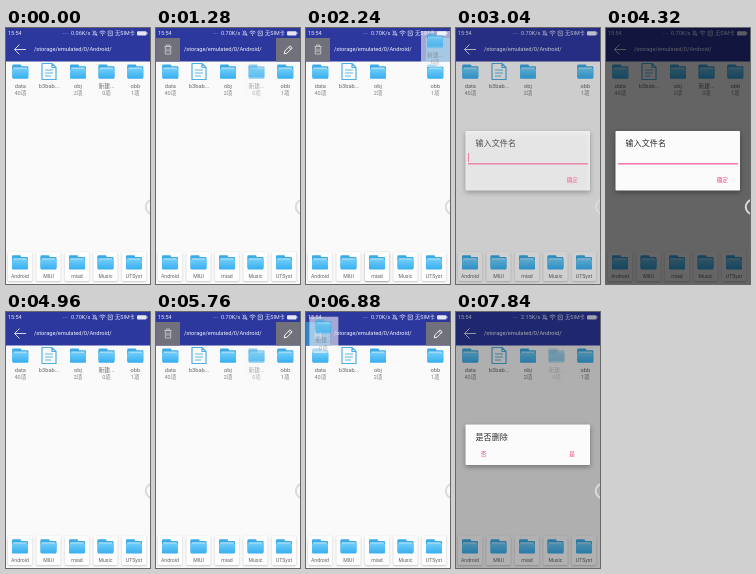
Write an HTML page with a canvas that moves like this. It is 144 px wide and 256 px high and loops after 8 s.

```html
<!DOCTYPE html>
<html lang="zh">
<head>
<meta charset="utf-8">
<style>
html, body { margin: 0; width: 100%; height: 100%; overflow: hidden; background: #fafafa; }
canvas { display: block; width: 100vw; height: 100vh; }
</style>
</head>
<body>
<canvas id="stage"></canvas>
<script>
const W = 144, H = 256, LOOP = 8000, STEP = 160;
const BLUE = '#2d389f', PINK = '#f0478a', GRAY = '#70717a', HOVER = '#3083ca';
const FONT = 'Roboto, "Noto Sans CJK SC", "Noto Sans CJK", sans-serif';
const canvas = document.getElementById('stage');
const ctx = canvas.getContext('2d');

const clamp = v => Math.max(0, Math.min(1, v));
const ramp = (t, a, b) => clamp((t - a) / (b - a));
const ease = v => v * v * (3 - 2 * v);
const within = (t, a, b) => t >= a && t < b;

function resize() {
  const dpr = window.devicePixelRatio || 1;
  canvas.width = Math.round(innerWidth * dpr);
  canvas.height = Math.round(innerHeight * dpr);
}

function rect(x, y, w, h, color) {
  ctx.fillStyle = color;
  ctx.fillRect(x, y, w, h);
}

function rounded(x, y, w, h, r, color) {
  ctx.fillStyle = color;
  ctx.beginPath();
  ctx.roundRect(x, y, w, h, r);
  ctx.fill();
}

function text(s, x, y, size, color, align = 'left') {
  ctx.font = `${size}px ${FONT}`;
  ctx.textAlign = align;
  ctx.textBaseline = 'middle';
  ctx.fillStyle = color;
  ctx.fillText(s, x, y);
}

function line(d, color, width = 1) {
  ctx.strokeStyle = color;
  ctx.lineWidth = width;
  ctx.stroke(new Path2D(d));
}

function at(x, y, alpha, draw) {
  ctx.save();
  ctx.translate(x, y);
  ctx.globalAlpha *= alpha;
  draw();
  ctx.restore();
}

function shadowed(blur, dy, alpha, draw) {
  const k = canvas.width / W;
  ctx.save();
  ctx.shadowColor = `rgba(0,0,0,${alpha})`;
  ctx.shadowBlur = blur * k;
  ctx.shadowOffsetY = dy * k;
  draw();
  ctx.restore();
}

function folder(x, y) {
  at(x, y, 1, () => {
    rounded(-8, -7, 9, 5, 1, '#3aabe6');
    rounded(-8, -5.3, 16, 11, 1, '#3aabe6');
    rect(-6.8, -4, 13.6, 2, '#b5e0f7');
    const g = ctx.createLinearGradient(0, -3, 0, 7);
    g.addColorStop(0, '#70cdf9');
    g.addColorStop(1, '#38aff0');
    rounded(-8, -2.8, 16, 10, 1, g);
  });
}

function documentIcon(x, y) {
  at(x, y, 1, () => {
    ctx.lineJoin = 'round';
    line('M-7 -8H3L7 -4V8H-7ZM3 -8V-4H7', '#4fb0e3', 1.2);
    line('M-4 -1.5H4M-4 1.5H4M-4 4.5H2', '#62b8e5', 1);
  });
}

function item(x, name, count) {
  if (count) folder(x, 43.5);
  else documentIcon(x, 43.5);
  text(name, x, 58, 5.7, '#666', 'center');
  if (count) text(count, x, 65.4, 5.5, '#808080', 'center');
}

const newFolder = () => item(100.5, '新建...', '0项');

function statusBar(t) {
  const speed = t < 1280 ? '0.06' : t < 7040 ? '0.70' : '2.15';
  const ink = '#e4e6f5';
  text('15:54', 2, 5.3, 5.5, ink);
  text('...', 57, 4.6, 6, ink);
  text(speed + 'K/s', 65, 5.3, 5.5, ink);
  line('M86.6 6.8H91L90 5.5V4Q88.8 1.5 87.6 4V5.5ZM86.5 2.5L91.2 8', ink, .6);
  line('M93.5 4.2Q96.5 1.6 99.5 4.2M94.7 5.6Q96.5 4 98.3 5.6', ink, .8);
  rect(96, 6.5, 1, 1.2, ink);
  line('M102.2 3H106.4V7.7H102.2ZM103.3 4.3L105.3 6.4M105.3 4.3L103.3 6.4', ink, .6);
  text('无SIM卡', 109, 5.3, 5.3, ink);
  rounded(131, 3.2, 9.5, 4.2, 1, ink);
  rect(140.6, 4.3, .8, 2, ink);
}

function header(dragging, t) {
  rect(0, 0, W, 33.5, BLUE);
  statusBar(t);
  text('/storage/emulated/0/Android/', 28, 21.7, 5.7, '#f0f1fa');
  if (!dragging) {
    line('M20 21.5H8.5M13.5 16.5L8.5 21.5L13.5 26.5', '#e8eaf6', .9);
    return;
  }
  const overTrash = t >= 6880, overPencil = within(t, 1920, 2720);
  rect(0, 10, 24, 23.5, overTrash ? HOVER : GRAY);
  rect(120, 10, 24, 23.5, overPencil ? HOVER : GRAY);
  line('M8.5 18.5H15.5M10.5 18.5V17H13.5V18.5M9.3 18.5V26H14.7V18.5M11 20.5V24M13 20.5V24', '#d2d2d6', .8);
  if (!overPencil) {
    line('M128.2 25.8L128.8 23L134 17.8L136.2 20L131 25.2ZM132.7 19.2L134.8 21.3', '#fff', .9);
  }
}

function shelf(pressed) {
  ['Android', 'MIUI', 'miad', 'Music', 'UTSyst'].forEach((name, i) => {
    const x = 14 + i * 28.5;
    shadowed(2, .8, pressed && i === 2 ? .45 : .24, () =>
      rounded(x - 12.2, 224, 24.4, 29, 1.2, '#fdfdfd'));
    folder(x, 234.3);
    text(name, x, 248, 5.2, '#666', 'center');
  });
}

function dialog(y, h, alpha, title, content) {
  if (!alpha) return;
  ctx.save();
  ctx.globalAlpha = alpha;
  shadowed(5, 2, .35, () => rounded(9.5, y, 124.5, h, 1, '#fbfbfb'));
  text(title, 19.5, y + 13, 8.1, '#2c2c2c');
  content();
  ctx.restore();
}

function renameDialog(t) {
  const alpha = ramp(t, 2860, 3085) * (1 - ramp(t, 4440, 4600));
  dialog(103, 59.5, alpha, '输入文件名', () => {
    rect(12, 135.3, 120, 1.1, PINK);
    if ((t - 2600) % 1000 < 500) rect(12, 125, .8, 9, PINK);
    text('确定', 116.3, 152, 5.6, PINK, 'center');
  });
}

function deleteDialog(t) {
  dialog(112.5, 40.5, ramp(t, 7600, 7840), '是否删除', () => {
    text('否', 27.5, 142.3, 5.7, PINK, 'center');
    text('是', 116, 142.3, 5.7, PINK, 'center');
  });
}

function dragGhost(t) {
  const first = t < 4000;
  const p = ease(first ? ramp(t, 1360, 2120) : ramp(t, 5920, 7040));
  const [dx, dy] = first ? [28.5, -31] : [-88, -31];
  at(dx * p, dy * p, .58, () => {
    rect(86.5, 34, 29, 36, '#fafafa');
    newFolder();
  });
}

function draw(t) {
  ctx.setTransform(canvas.width / W, 0, 0, canvas.height / H, 0, 0);
  ctx.globalAlpha = 1;
  rect(0, 0, W, H, '#fafafa');
  const dragging = within(t, 960, 2720) || within(t, 5200, 7520);

  header(dragging, t);
  item(14.3, 'data', '40项');
  item(43, 'b3bab...');
  item(72, 'obj', '2项');
  item(129.3, 'obb', '1项');
  shelf(within(t, 1760, 2720));

  if (dragging) {
    dragGhost(t);
  } else {
    const back = within(t, 2720, 4000) ? ramp(t, 3040, 3400)
      : t >= 7520 ? ramp(t, 7680, 8200) : 1;
    at(0, 0, back, newFolder);
  }

  const dim = .6 * (ramp(t, 2920, 3320) * (1 - ramp(t, 4450, 4850)) + ramp(t, 7640, 8040));
  rect(0, 0, W, H, `rgba(0,0,0,${dim})`);
  renameDialog(t);
  deleteDialog(t);

  ctx.beginPath();
  ctx.arc(147, 179, 7.2, 0, Math.PI * 2);
  ctx.strokeStyle = '#dadada';
  ctx.lineWidth = 2;
  ctx.stroke();
}

const start = performance.now();
function tick() {
  const t = (performance.now() - start) % LOOP;
  draw(Math.floor(t / STEP) * STEP);
  requestAnimationFrame(tick);
}

addEventListener('resize', resize);
resize();
tick();
</script>
</body>
</html>
```
